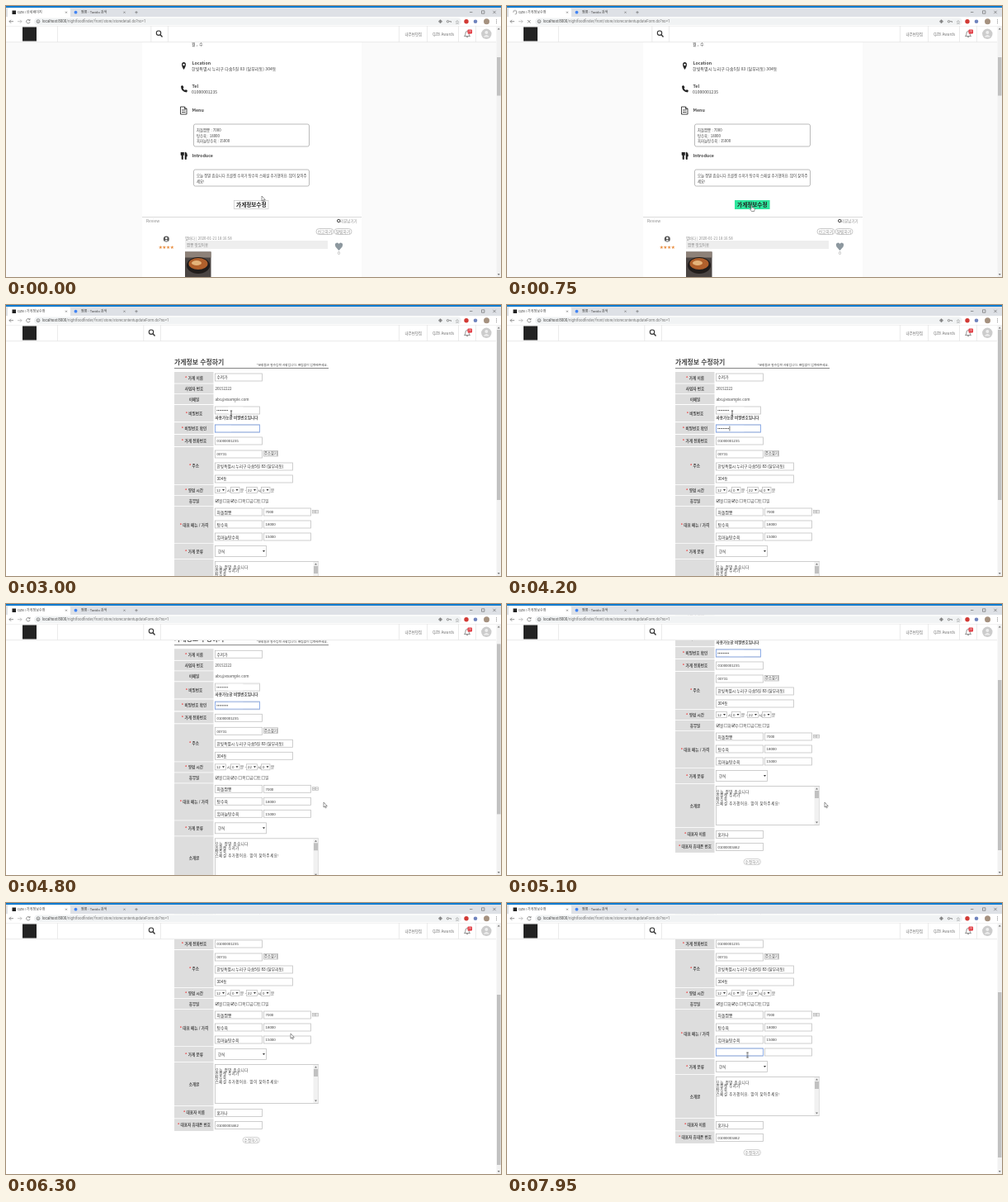
An HTML page that plays this animation: 600x328 px, repeating every 8000 ms.

```html
<!DOCTYPE html>
<html lang="ko">
<head>
<meta charset="utf-8">
<title>가게정보수정</title>
<style>
html,body{margin:0;width:100%;height:100%;overflow:hidden;background:#fff}
svg{display:block;width:100vw;height:100vh}
text{font-family:"Noto Sans CJK KR","Noto Sans CJK",sans-serif;fill:#444;white-space:pre}
.ui{font-family:Roboto,"Noto Sans CJK KR",sans-serif}
.field{font-family:"Liberation Sans","Noto Sans CJK KR",sans-serif;fill:#333}
.note{letter-spacing:.6px}
.bold{font-weight:700}
.mid{text-anchor:middle}
.dim{fill:#888}
.icon{fill:none;stroke:#666;stroke-width:.7}
.blink{animation:blink 1s -850ms step-end infinite}
.spin{transform-origin:9.7px 7.7px;animation:spin 1s linear infinite}
@keyframes blink{50%,100%{opacity:0}}
@keyframes spin{to{transform:rotate(360deg)}}
</style>
</head>
<body>
<svg id="stage" viewBox="0 0 600 328"></svg>
<script>
const LOOP = 8000, LOADED = 800, CHECKED = 2750, ADDED = 7050;
let css = '', count = 0;

// Each helper registers keyframes and returns the class that plays them.
function animate(frames, easing) {
  const id = 'a' + count++;
  const steps = frames.map(([ms, rule]) => `${ms * 100 / LOOP}%{${rule}}`).join('');
  css += `@keyframes ${id}{${steps}}.${id}{animation:${id} ${LOOP}ms ${easing} infinite}`;
  return id;
}
function shown(from, to = LOOP) {
  const frames = [[0, `opacity:${from ? 0 : 1}`]];
  if (from) frames.push([from, 'opacity:1']);
  if (to < LOOP) frames.push([to, 'opacity:0']);
  frames.push([LOOP, `opacity:${to < LOOP ? 0 : 1}`]);
  return animate(frames, 'step-end');
}
const at = (x, y) => `transform:translate(${x}px,${y}px)`;
const drop = (ms, dy) => animate([[0, at(0, 0)], [ms, at(0, dy)], [LOOP, at(0, dy)]], 'step-end');

const group = (cls, ...parts) => `<g class="${cls}">${parts.join('')}</g>`;
const text = (x, y, s, size, cls = '', fill = '') =>
  `<text x="${x}" y="${y + size * .37}" font-size="${size}" class="${cls}"${fill && ` style="fill:${fill}"`}>${s}</text>`;
const rect = (x, y, w, h, fill, more = '') =>
  `<rect x="${x}" y="${y}" width="${w}" height="${h}" fill="${fill}" ${more}/>`;
const frame = (x, y, w, h, stroke = '#c2c2c2', r = 0, fill = '#fff') =>
  rect(x + .5, y + .5, w - 1, h - 1, fill, `stroke="${stroke}" stroke-width=".8" rx="${r}"`);
const dot = (x, y, r, fill) => `<circle cx="${x}" cy="${y}" r="${r}" fill="${fill}"/>`;
const path = (d, more = 'class="icon"') => `<path d="${d}" ${more}/>`;
const vline = (x, a, b) => rect(x, a, .7, b - a, '#e2e2e2');

function input(x, y, w, value = '', size = 4.7) {
  return frame(x, y, w, 10) + text(x + 2.5, y + 5.2, value, size, 'field');
}
const focus = (x, y, w, from, to) =>
  group(shown(from, to), rect(x + .5, y + .5, w - 1, 9, 'none', 'stroke="#7fa6ee" stroke-width=".8"'));

function detailPage() {
  const heading = (y, s) => text(225.5, y, s, 5.3, 'bold');
  return group(shown(0, LOADED),
    rect(0, 24, 600, 304, '#fafafa'), rect(165, 24, 266, 304, '#fff'),
    text(225, 46, '월 , 수', 5.1),
    heading(69, 'Location'), text(225, 76, '한빛특별시 누리구 다솜5길 83 (달무리동) 304동', 5.1),
    heading(97, 'Tel'), text(225, 104, '01000001235', 5.1),
    heading(126.5, 'Menu'), heading(181, 'Introduce'),
    path('M215.500 77C212 72 212.500 68 215.500 68S219 72 215.500 77Z', 'fill="#222"'), dot(215.5, 71, 1.2, '#fff'),
    path('M212 97l2-1 1.500 2.500-1 1q1 2 2.500 2.500l1-1 2 1.500-1 2q-7-.500-7-7.500', 'fill="#222"'),
    path('M211.500 122h5l2.500 2.500v6.500h-7.500zM216.500 122v2.500h2.500M213 126h4.500M213 128.500h4.500', 'fill="none" stroke="#333" stroke-width=".9"'),
    path('M212 177v3.500h1v5h1.500v-5h1v-3.500M217 185.500v-8.500q2.500 0 2.500 5h-1v3.500z', 'fill="#222" stroke="#222" stroke-width=".6"'),
    frame(227, 142.5, 141, 28, '#aaa', 2),
    ['차돌짬뽕 : 7000', '탕수육 : 18000', '흑마늘탕수육 : 15000'].map((s, i) => text(231, 150 + i * 6.9, s, 4.4)).join(''),
    frame(227, 197.5, 141, 21, '#aaa', 2),
    text(231, 205, '오늘 정말 춥습니다 초콜렛 수저가 탕수육 스페셜 추가했어요. 많이 찾아주', 4.4),
    text(231, 212, '세요!', 4.4),
    frame(276, 235, 42.5, 11, '#ccc'),
    group(shown(350, LOADED), rect(276, 235, 42.5, 11, '#2ee59d')),
    text(297.3, 240.5, '가게정보수정', 6.6, 'bold mid', '#222'),
    rect(165, 255.3, 266, .7, '#ccc'),
    text(170, 260, 'Review', 4.8, 'dim'),
    path('M405 260a1.700 1.700 0 1 1-3.400 0a1.700 1.700 0 1 1 3.400 0', 'fill="none" stroke="#333"'),
    text(405, 260, '리뷰남기기', 4.5, 'dim'),
    frame(375.5, 269, 22, 8, '#bbb', 3.5), text(386.5, 273, '신고하기', 4.8, 'mid dim'),
    frame(397.5, 269, 22, 8, '#bbb', 3.5), text(408.5, 273, '알림하기', 4.8, 'mid dim'),
    dot(194.3, 282, 3.5, '#555'), dot(194.3, 281, 1.3, '#fff'), path('M192 284.500q2.300-3 4.600 0z', 'fill="#fff"'),
    text(194.3, 291, '★★★★', 4.7, 'mid', '#e88a3a'),
    text(217, 281, '별바다 | 2020-01-21 18:16:58', 4.4, 'dim'),
    rect(217, 284, 173, 10, '#eee'), text(219, 289, '짬뽕 맛있어용', 4.5, 'dim'),
    rect(217, 297.5, 31.5, 31, '#4b4543'), rect(217, 297.5, 31.5, 7, '#8d8178'),
    '<ellipse cx="233" cy="314" rx="14" ry="10" fill="#201c1b"/><ellipse cx="233" cy="312" rx="11.500" ry="7" fill="#b0602c"/><ellipse cx="231" cy="311" rx="6" ry="3" fill="#e4b37a"/>',
    path('M403.500 296l-4-4.500q-2-4.500 2-5 1.500 0 2 1.500 .500-1.500 2-1.500 4 .500 2 5z', 'fill="#8d989f"'),
    text(403.5, 299.5, '0', 4.5, 'mid dim'));
}

function label(s, top, height, required, shift = '', extra = 0) {
  const star = required ? '<tspan fill="#e22">* </tspan>' : '';
  return rect(204, top, 47.5, height + extra, '#ddd') +
    group(shift, text(228, top + height / 2, star + s, 4.6, 'bold mid'));
}

// A white cover slides off the bullets one character at a time, carrying the caret.
function password(y, start, end, blur) {
  const cover = animate([[0, at(0, 0)], [start, at(0, 0)], [end, at(14.4, 0)], [LOOP, at(14.4, 0)]], 'steps(9)');
  const bullets = Array.from({length: 9}, (_, i) => dot(255.9 + i * 1.6, y + 5, .6, '#333')).join('');
  return frame(253, y, 55, 10) + bullets +
    group(cover, rect(255, y + 1, 18, 8, '#fff'),
      group(shown(start - 50, blur), rect(255.2, y + 2, .6, 6, '#222', 'class="blink"')));
}

function select(x, y, w, h, value) {
  return frame(x, y, w, h) + text(x + 2, y + h / 2, value, 4.3, 'field') +
    path(`M${x + w - 5} ${y + h / 2 - 1}h3l-1.500 2z`, 'fill="#333"');
}

function formPage() {
  const scroll = animate([[0, at(0, 0)], [4650, at(0, 0)], [5050, at(0, -90)], [5700, at(0, -90)],
    [6050, at(0, -115)], [LOOP, at(0, -115)]], 'ease-in-out');
  const menu = [['차돌짬뽕', 7000], ['탕수육', 18000], ['흑마늘탕수육', 15000]];
  const days = [...'월화수목금토일'].map((d, i) => {
    const x = 253.5 + i * 9.35;
    const tick = i % 2 == 0 && i < 3 ? path(`M${x + .8} 230l1 1.300 2-3`, 'fill="none" stroke="#333" stroke-width=".8"') : '';
    return frame(x, 227.8, 4.6, 4.6, '#aaa') + tick + text(x + 4.6, 230, d, 4.5);
  }).join('');
  const intro = ['오늘 정말 춥습니다', '초콜렛 수저가', '탕수육', '스페셜 추가했어요. 많이 찾아주세요!'];

  const tail = group(drop(ADDED, 15),
    rect(200, 281.3, 200, 170, '#fff'),
    label('가게 분류', 282, 18.2, true), select(253, 284, 63, 14, ''), text(257, 291, '한식', 4.5, 'field'),
    label('소개글', 301, 52.2), frame(253, 303, 126, 48),
    rect(372.5, 304, 6, 46, '#f1f1f1'), rect(373, 309, 5, 9, '#c1c1c1'),
    path('M374 307.500l1.500-2 1.500 2zM374 346.500l1.500 2 1.500-2z', 'fill="#777"'),
    intro.map((s, i) => text(253.8, 310 + i * 4.8, s, 4.3, 'field note')).join(''),
    label('대표자 이름', 354, 14.4, true), input(253, 357, 58, '홍가나'),
    label('대표자 휴대폰 번호', 369.3, 14.6, true), input(253, 372, 58, '01000003462', 4.3),
    frame(286.5, 391, 21.5, 8, '#c8c8c8', 3.5), text(297.2, 395, '수정하기', 4.7, 'mid dim'));

  const lower = group(drop(CHECKED, 7),
    rect(200, 134.3, 200, 300, '#fff'),
    label('비밀번호 확인', 135.2, 13.8, true), password(137.5, 3350, 4100, 7600), focus(253, 137.5, 55, CHECKED, 7600),
    label('가게 전화번호', 150, 14, true), input(253, 152.5, 58, '01000001235', 4.3),
    label('주소', 165, 45.2, true), input(253, 168.5, 58, '00731', 4.3),
    frame(312, 169, 18, 7.5, '#bbb', 0, '#f4f4f4'), text(321, 172.7, '주소찾기', 4.3, 'mid'),
    input(253, 183.5, 95, '한빛특별시 누리구 다솜5길 83 (달무리동)'), input(253, 198.5, 95, '304동'),
    label('영업 시간', 211, 12.2, true),
    select(253, 213, 14, 8, '12'), text(267.7, 217, '시', 4.5), select(272, 213, 11.5, 8, '0'), text(284, 217, '분 -', 4.5),
    select(291, 213, 14, 8, '22'), text(305.2, 217, '시', 4.5), select(309, 213, 11.5, 8, '0'), text(321, 217, '분', 4.5),
    label('휴무일', 224, 12.2), days,
    label('대표 메뉴 / 가격', 237, 43.6, true, drop(ADDED, 7.5), 15),
    menu.map(([name, price], i) => input(253, 238.5 + i * 15, 58, name, 4.9) + input(312, 238.5 + i * 15, 58, price, 4.4)).join(''),
    frame(371, 241, 4, 4.5, '#bbb'), frame(375, 241, 4, 4.5, '#bbb'),
    path('M372 243.200h2M373 242.200v2M376 243.200h2', 'stroke="#888" stroke-width=".4"'),
    group(shown(ADDED), input(253, 283.5, 58), input(312, 283.5, 58)),
    tail, focus(253, 283.5, 58, 7600));

  return group(shown(LOADED), rect(0, 24, 600, 304, '#fff'), group(scroll,
    text(204, 69, '가게정보 수정하기', 7.9, 'bold'),
    text(304, 72.5, '*문항들은 필수입력 사항입니다. 빠짐없이 입력해주세요.', 3.7),
    rect(204, 76, 187, .8, '#666'),
    label('가게 이름', 81, 13.6, true), input(253, 82.5, 58, '수저가'),
    label('사업자 번호', 95.5, 11.7), text(253.5, 101.5, '20152222', 4.5),
    label('이메일', 108, 12), text(253.5, 114, 'abc@example.com', 4.6),
    label('비밀번호', 121, 13.4, true, drop(CHECKED, 3.3), 7),
    password(122.5, 1800, 2600, CHECKED), focus(253, 122.5, 55, 1450, CHECKED),
    group(shown(CHECKED), text(253.5, 136, '사용가능한 비밀번호입니다', 4.6, 'bold')),
    lower));
}

function siteHeader() {
  const search = x => vline(x - 10, 24, 43.5) + vline(x + 10.5, 24, 43.5) +
    `<circle cx="${x - .5}" cy="32.700" r="2.700" fill="none" stroke="#333" stroke-width="1.100"/>` +
    path(`M${x + 1.5} 34.700l2.500 2.700`, 'stroke="#333" stroke-width="1.400"');
  return rect(0, 24, 594, 20, '#fff') + rect(0, 43.4, 594, .7, '#e2e2e2') +
    rect(20, 25.5, 17, 17, '#222') + vline(62, 24, 43.5) +
    group(shown(0, LOADED), search(185.5)) + group(shown(LOADED), search(176.5)) +
    [476, 510, 548, 569].map(x => vline(x, 24, 43.5)).join('') +
    text(483.5, 34, '내주변맛집', 4.5, '', '#777') + text(517, 34, 'QZB Awards', 4.6, '', '#777') +
    path('M555.500 36.500q1.500-1 1.500-3.500 0-2.500 2-2.500t2 2.500q0 2.500 1.500 3.500zM558 37.700h2') +
    rect(559.5, 28.5, 5.5, 5, '#e03038', 'rx="1"') + text(562.2, 31, '28', 3.3, 'mid', '#fff') +
    dot(582.3, 33.8, 6.2, '#ccc') + dot(582.3, 32, 2, '#eee') + path('M578.500 37.500q3.800-5 7.600 0z', 'fill="#eee"');
}

function browser() {
  const url = page => text(44, 18.7, 'localhost:8000<tspan fill="#777">/nightfoodfinder/front/store/' + page + '</tspan>', 4.45, 'ui');
  const reload = path('M28.500 17.300a2.200 2.200 0 1 0 .500 2M29 16v1.700h-1.700');
  const favicon = rect(7.5, 5.5, 4.5, 4.5, '#222');
  return rect(0, 0, 600, 13.5, '#dee1e6') + rect(0, 0, 600, 2, '#0f7bd0') +
    rect(2, 2.5, 76, 12, '#fff', 'rx="2"') +
    group(shown(0, 650), favicon, text(14, 7.8, 'QZB | 상세페이지', 4.1, 'ui')) +
    group(shown(650), text(14, 7.8, 'QZB | 가게정보수정', 4.1, 'ui')) +
    group(shown(650, 2700), path('M9.700 5.500a2.200 2.200 0 1 1-2.200 2.200', 'class="icon spin"')) +
    group(shown(2700), favicon) +
    dot(84.5, 7.7, 1.9, '#4285f4') + text(91, 7.8, '짬뽕 - Tavido 검색', 4.1, 'ui') +
    path('M72 6.700l2 2m0-2l-2 2M142.500 6.700l2 2m0-2l-2 2M156.300 7.700h3.400M158 6v3.400', 'stroke="#666" stroke-width=".6"') +
    vline(151, 5, 11) +
    path('M562 7.500h3.400M576.500 5.800h3.400v3.400h-3.400zM590.300 5.800l3.400 3.400m0-3.400l-3.400 3.400', 'fill="none" stroke="#444" stroke-width=".5"') +
    rect(0, 13.3, 600, 10.9, '#fff') + rect(34, 14.4, 518, 8.8, '#f1f3f4', 'rx="4.400"') +
    path('M9 18.700h-5m2-2l-2 2 2 2') + path('M14 18.700h5m-2-2l2 2-2 2', 'fill="none" stroke="#aaa" stroke-width=".7"') +
    group(shown(0, 650), reload) + group(shown(LOADED), reload) +
    group(shown(650, LOADED), path('M25 17l3.500 3.500m0-3.500l-3.500 3.500')) +
    '<circle cx="39" cy="18.700" r="1.900" class="icon"/>' + path('M39 18.200v1.700') +
    group(shown(0, 650), url('storedetail.do?no=1')) +
    group(shown(650), url('storecontentupdateForm.do?no=1')) +
    '<circle cx="526.500" cy="18.700" r="1.600" class="icon"/>' + path('M524.500 18.700h4M526.500 16.700v4') +
    '<circle cx="535.500" cy="18.700" r="1.200" class="icon"/>' + path('M537 18.700h2.500v1.200') +
    text(547, 18.7, '☆', 5, 'mid ui') + dot(558, 18.7, 2.7, '#d23a35') +
    dot(569, 18.7, 2.3, '#6f83bd') + dot(582.5, 18.7, 3.5, '#a5917f') +
    [16.7, 18.7, 20.7].map(y => dot(594.5, y, .5, '#666')).join('') +
    rect(0, 24, 600, .4, '#ddd');
}

function scrollbar() {
  const bar = (ms, y, h) => [ms, `y:${y}px;height:${h}px`];
  const thumb = animate([bar(0, 62, 46.5), bar(799, 62, 46.5), bar(800, 30, 210), bar(CHECKED - 1, 30, 210),
    bar(CHECKED, 30, 206), bar(4650, 30, 206), bar(5050, 92, 206), bar(5700, 92, 206), bar(6050, 111, 206),
    bar(ADDED - 1, 111, 206), bar(ADDED, 108, 200), bar(LOOP, 108, 200)], 'ease-in-out');
  return rect(594.5, 24.3, 5.5, 304, '#f1f1f1') +
    `<rect x="595" y="62" width="4.500" height="46.500" fill="#c1c1c1" class="${thumb}"/>` +
    path('M595.700 28.500l1.500-2 1.500 2zM595.700 324l1.500 2 1.500-2z', 'fill="#777"');
}

function pointer() {
  const stops = [[0, 310, 230], [100, 310, 230], [400, 297, 245], [900, 297, 245], [1400, 273, 131], [4300, 273, 131],
    [4800, 385, 240], [5500, 385, 240], [6250, 345, 158], [6450, 345, 158], [6850, 373, 134],
    [7100, 373, 134], [7600, 291.5, 184], [LOOP, 291.5, 184]];
  const track = animate(stops.map(([ms, x, y]) => [ms, at(x, y)]), 'ease-in-out');
  const outline = 'fill="#fff" stroke="#333" stroke-width=".5" stroke-linejoin="round"';
  const arrow = path('M0 0v6l1.400-1.200 .900 2.100 1-.400-.900-2h1.900z', outline);
  const hand = path('M-1-3.500q.700-.700 1.200 0v2.500l2.600.600q.700.400.500 1.500l-.600 2.400h-3.200l-2-2.500q0-1 1.500-.200z', outline);
  const beam = path('M-1.200-3h2.400M0-3v6M-1.200 3h2.400', 'fill="none" stroke="#222" stroke-width=".7"');
  return group(track,
    group(shown(0, 350), arrow), group(shown(350, LOADED), hand), group(shown(LOADED, 1300), arrow),
    group(shown(1300, 4400), beam), group(shown(4400, 7450), arrow), group(shown(7450), beam));
}

const picture = [detailPage, formPage, siteHeader, browser, scrollbar, pointer].map(draw => draw()).join('');
document.getElementById('stage').innerHTML = `<style>${css}</style>${picture}`;
</script>
</body>
</html>
```
